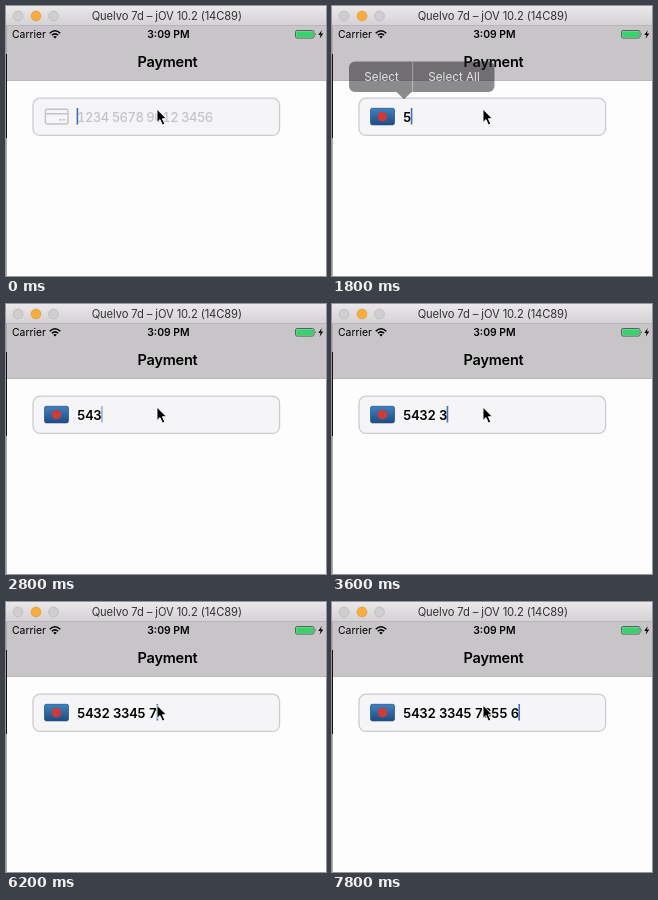
An HTML page that plays this animation: 320x270 px, repeating every 8 s.

```html
<!DOCTYPE html>
<html lang="en">
<head>
<meta charset="utf-8">
<title>Payment</title>
<style>
  html, body { margin: 0; width: 100%; height: 100%; overflow: hidden; }
  svg { display: block; width: 320px; height: 270px; }
  text { font-family: Inter, Roboto, sans-serif; white-space: pre; }
  .number { font-size: 13px; letter-spacing: -.25px; font-feature-settings: "tnum"; }
  .bold { font-weight: 600; }
</style>
</head>
<body>
<svg viewBox="0 0 320 270">
  <defs>
    <linearGradient id="bar" x2="0" y2="1">
      <stop stop-color="#ebe8eb"/><stop offset="1" stop-color="#d4d1d4"/>
    </linearGradient>
    <linearGradient id="blue" x2="0" y2="1">
      <stop stop-color="#3b83c4"/><stop offset="1" stop-color="#1d4d84"/>
    </linearGradient>
  </defs>

  <!-- Window and navigation bar -->
  <rect width="320" height="270" fill="#fefdfe"/>
  <rect y="20" width="320" height="55" fill="#c7c5c7"/>
  <rect width="320" height="20" fill="url(#bar)"/>
  <path d="M0 19.5H320M0 74.5H320" stroke="#b9b7b9"/>
  <path d="M.5 20V270" stroke="#aaa8aa"/>
  <path d="M.5 48V132" stroke="#111"/>
  <g stroke-width=".7">
    <circle cx="12" cy="10" r="4.9" fill="#d0cfd0" stroke="#b8b7b8"/>
    <circle cx="30" cy="10" r="4.9" fill="#fbad3c" stroke="#dd9a35"/>
    <circle cx="47.5" cy="10" r="4.9" fill="#d0cfd0" stroke="#b8b7b8"/>
  </g>
  <text x="160.8" y="14" text-anchor="middle" font-size="11.2" letter-spacing="-.1" fill="#333">Quelvo 7d – jOV 10.2 (14C89)</text>

  <!-- Status bar -->
  <text x="6" y="32" font-size="10.4">Carrier</text>
  <path d="M43.7 27.2Q49 22.4 54.3 27.2M45.8 29.3Q49 26.4 52.2 29.3" fill="none" stroke="#000" stroke-width="1.5"/>
  <path d="M47.2 30.7Q49 29.2 50.8 30.7L49 32.6Z"/>
  <text x="162.4" y="32" text-anchor="middle" font-size="10.4" class="bold">3:09 PM</text>
  <rect x="289.5" y="24.5" width="18.5" height="7.6" rx="1.6" fill="none" stroke="#2d5139" stroke-width=".8"/>
  <rect x="290.4" y="25.4" width="16.7" height="5.8" rx=".8" fill="#33d56a"/>
  <path d="M309 26.8q1.3 1.5 0 3z" fill="#2d5139"/>
  <path d="M315.8 24L312.3 28.9H314.6L313.6 32.7L317.3 27.6H314.9Z"/>
  <text x="161.5" y="61" text-anchor="middle" font-size="14.5" letter-spacing="-.2" class="bold">Payment</text>

  <!-- Card field -->
  <rect x="27" y="92.2" width="246.6" height="37.2" rx="7" fill="#f5f4f6" stroke="#cbcace" stroke-width="1.3"/>
  <g id="empty">
    <rect x="39.4" y="103.2" width="22.6" height="14.8" rx="2" fill="none" stroke="#c3c2c6" stroke-width="1.4"/>
    <path d="M39.4 107.8H62M53 113.8h2.6m1.2 0h2.4" stroke="#c3c2c6" stroke-width="1.4"/>
    <text class="number" x="71" y="115.6" font-weight="500" style="letter-spacing:-.5px" fill="#c4c3c7">1234 5678 9012 3456</text>
  </g>
  <g id="filled">
    <rect x="38.5" y="102.3" width="24" height="16.6" rx="1.8" fill="url(#blue)" stroke="#244d7b" stroke-width=".7"/>
    <circle cx="50.5" cy="110.6" r="4.8" fill="#d13a34"/>
    <text class="number bold" id="digits" x="71" y="115.6"></text>
  </g>
  <rect id="caret" y="102" width="1.6" height="16.5" fill="#3e70bf"/>

  <!-- Edit menu -->
  <g id="menu">
    <path d="M23 55.5H156.5a6 6 0 0 1 6 6V80a6 6 0 0 1-6 6H79.5L72 93.3L64.5 86H23a6 6 0 0 1-6-6V61.5a6 6 0 0 1 6-6Z" fill="#1b1a1c"/>
    <path d="M80.6 55.5V86" stroke="#8b8a8c" stroke-width=".9"/>
    <g font-size="11.7" fill="#fff" text-anchor="middle">
      <text x="49.6" y="75.2">Select</text>
      <text x="122" y="75.2">Select All</text>
    </g>
  </g>

  <path d="M151 103.2V116.4L154 113.6L156.4 119L158.8 118L156.4 112.7H160.4Z" stroke="#fff" stroke-width=".9"/>
</svg>
<script>
  const LOOP = 8000, STEP = 200;
  const el = id => document.getElementById(id);
  const [empty, filled, digits, caret, menu] =
    ["empty", "filled", "digits", "caret", "menu"].map(el);

  // Each entry: time of the key press in ms, value after it
  const typed = [
    [0, ""], [1800, "5"], [2000, "54"], [2200, "543"], [3200, "5432 "],
    [3600, "5432 3"], [4200, "5432 33"], [4400, "5432 334"], [4800, "5432 3345 "],
    [6200, "5432 3345 7"], [6400, "5432 3345 76"], [6600, "5432 3345 765"],
    [7000, "5432 3345 7655 "], [7400, "5432 3345 7655 6"]
  ];
  const show = (node, on) => node.style.display = on ? "" : "none";

  function draw(now) {
    const t = Math.floor(now % LOOP / STEP) * STEP;
    const [start, value] = typed.findLast(([time]) => time <= t);
    show(empty, !value);
    show(filled, value);

    // The first key press fades the menu out
    show(menu, t >= 800);
    menu.setAttribute("opacity", Math.max(0, Math.min(1, (2000 - t) / 400)));

    // The caret stays solid after a key press, then fades out and back
    digits.textContent = value;
    caret.setAttribute("x", 70.6 + (value ? digits.getComputedTextLength() : 0));
    caret.setAttribute("opacity", value ? Math.min(1, Math.abs(t - start - 800) / 400) : 1);
    requestAnimationFrame(draw);
  }
  draw(0);
</script>
</body>
</html>
```
